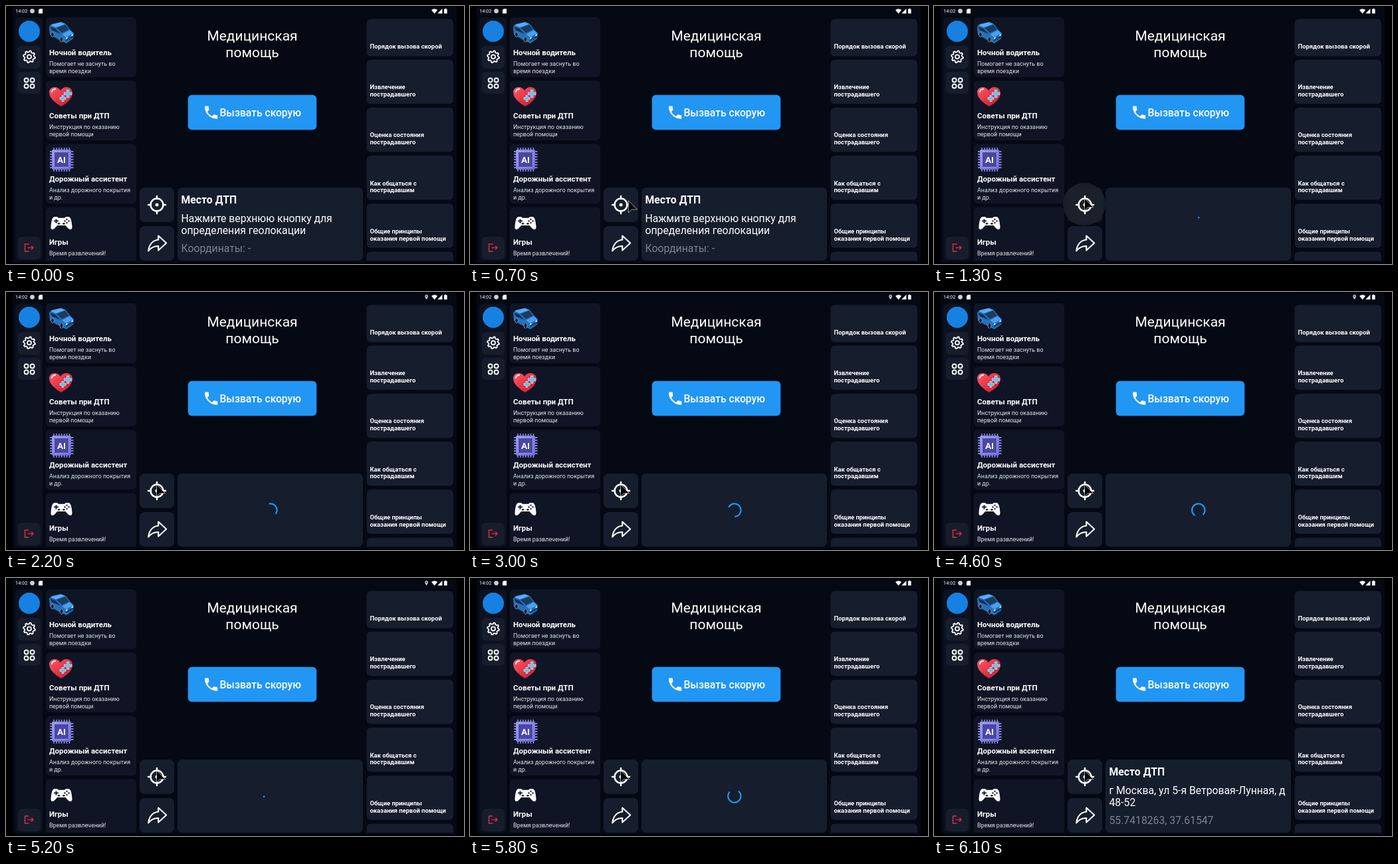
An HTML page that plays this animation: 689x388 px, repeating every 8000 ms.

```html
<!DOCTYPE html>
<html lang="ru">
<head>
<meta charset="utf-8">
<title>Медицинская помощь</title>
<style>
  html, body { margin: 0; width: 100%; height: 100%; overflow: hidden; background: #000; }
  svg { display: block; width: 689px; height: 388px; font-family: Roboto, "Noto Sans", sans-serif; fill: #fff; }
  .side { fill: #0c1220; }
  .card { fill: #0f1524; }
  .tile { fill: #161d2d; }
  .name { font-size: 11.45px; font-weight: 700; }
  .note { font-size: 8.9px; fill: #e4e6ea; }
  .tip { font-size: 9.4px; font-weight: 700; }
  .head { font-size: 21px; text-anchor: middle; }
  .info { font-size: 15.75px; }
  .bold { font-weight: 700; }
  .grey { fill: #7d828d; }
  .line { fill: none; stroke: #fff; stroke-linejoin: round; stroke-linecap: round; }
</style>
</head>
<body>
<svg viewBox="0 0 689 388">
  <defs>
    <clipPath id="view"><rect x="10" y="16" width="668" height="367"/></clipPath>
    <linearGradient id="red" x2="1" y2="1"><stop stop-color="#ff5a62"/><stop offset="1" stop-color="#c9152f"/></linearGradient>
    <linearGradient id="violet" x2="1" y2="1"><stop stop-color="#9a9cf8"/><stop offset="1" stop-color="#6a65d8"/></linearGradient>
  </defs>
  <rect width="689" height="388" fill="#000"/>
  <rect x="10" y="1" width="668" height="385" fill="#040914"/>

  <!-- status bar -->
  <text x="14" y="10.3" font-size="7.4">14:02</text>
  <circle cx="39.5" cy="7.6" r="3.4" fill="#d0d0d0"/>
  <path d="M50.8 4.2h4.2v7h-6V6z"/>
  <path id="pin" d="M632.6 4c-1.5 0-2.4 1-2.4 2.4 0 1.7 2.4 4.8 2.4 4.8s2.4-3.1 2.4-4.8c0-1.4-.9-2.4-2.4-2.4zm0 1.5a.9.9 0 1 1 0 1.8.9.9 0 0 1 0-1.8z" fill="#ccc"/>
  <path d="M640 6q4.600-3.600 9.200 0l-4.600 5.400z"/>
  <path d="M656.400 4v7.200h-7.200z"/>
  <path d="M659 4.700h1.300v-.9h2v.9h1.300v6.600H659z"/>

  <g clip-path="url(#view)">
    <!-- navigation rail -->
    <rect class="side" x="14" y="17" width="41" height="366" rx="6"/>
    <circle cx="35" cy="38" r="16" fill="#1681e2"/>
    <g class="tile">
      <rect x="18" y="60" width="34" height="34" rx="6"/>
      <rect x="18" y="99" width="34" height="33" rx="6"/>
      <rect x="18" y="347" width="34" height="34" rx="6"/>
    </g>
    <g class="line" stroke-width="1.8">
      <path id="gear"/>
      <circle cx="35" cy="76.300" r="3"/>
      <circle cx="30.600" cy="111.500" r="3"/><circle cx="39.600" cy="111.500" r="3"/>
      <circle cx="30.600" cy="120.500" r="3"/><circle cx="39.600" cy="120.500" r="3"/>
      <path d="M34 358h-5.500v11H34M33 363.500h8m-2.500-2.500 2.500 2.500-2.500 2.500" stroke="#e02b3c" stroke-width="1.500"/>
    </g>

    <g id="cards"></g>

    <!-- car -->
    <path d="M65 31l4-4 14-3 7 3 6 8 6 6-1 8-10 7-11-5-14-8z" fill="#2272c4"/>
    <path d="M67 28.500L82 24.500l7 2.500-14 5z" fill="#5fabf2"/>
    <path d="M66.500 31l7.500 2.500 8 8.500-13-5.500z" fill="#15304c"/>
    <path d="M76 33l13-5 6 7.500-11 5z" fill="#1b3b5c"/>
    <path d="M84.500 42.500l11-6 6 4.500-11.500 6z" fill="#4c9fee"/>
    <path d="M90 50l11-6v3.500l-11 6z" fill="#173f68"/>
    <g fill="#121b29" stroke="#7d92a8"><ellipse cx="70" cy="43" rx="2.300" ry="3.700"/><ellipse cx="83.500" cy="50.500" rx="2.500" ry="3.900"/></g>
    <path d="M90 48l2.500-1.300v2L90 50zM98.500 43.500l2.500-1.300v2l-2.500 1.300z" fill="#e7f4ff"/>

    <!-- heart -->
    <path d="M83 151C75 146 65 139 65 130c0-9 12-11 17-3 5-8 18-6 18 4 0 9-10 16-17 20z" fill="url(#red)"/>
    <path d="M69 129q1-4 5-4" class="line" stroke="#ff9ca0" stroke-width="2"/>
    <g fill="#59c5ec" stroke="#d9f5ff" stroke-width=".6">
      <path d="M91.500 126h3.500v4h4v3.500h-4v4h-3.500v-4h-4V130h4z"/>
      <path d="M84 134.500h3v3h3v3h-3v3h-3v-3h-3v-3h3z"/>
    </g>

    <!-- chip -->
    <g id="pins" stroke="#a3a8f6" stroke-width="1.300"></g>
    <rect x="69" y="216" width="29" height="30" rx="2" fill="url(#violet)"/>
    <rect x="72.500" y="219.500" width="22" height="23" rx="1" fill="#4a47a3" stroke="#b4b6ff" stroke-width=".7"/>
    <text x="83.500" y="236" font-size="13.500" font-weight="700" text-anchor="middle">AI</text>

    <!-- gamepad -->
    <g transform="translate(0 42) scale(1 .87)">
      <path d="M73 316h4l2 2h9l2-2h4c4 0 5 10 5.500 17 .3 6-4 6-7 2l-3-4H77l-3 4c-3 4-7 4-6.500-2C68 326 69 316 73 316z"/>
      <g fill="#111827">
        <path d="M74.500 320h2v2.500H79v2h-2.500V327h-2v-2.500H72v-2h2.500z"/>
        <circle cx="91.500" cy="320.500" r="1.300"/><circle cx="91.500" cy="326.500" r="1.300"/>
        <circle cx="88.500" cy="323.500" r="1.300"/><circle cx="94.500" cy="323.500" r="1.300"/>
        <circle cx="79.500" cy="328" r="1.700"/><circle cx="87" cy="328" r="1.700"/>
      </g>
    </g>

    <!-- centre -->
    <text class="head" x="370.500" y="52">Медицинская</text>
    <text class="head" x="370.500" y="77">помощь</text>
    <rect x="273.700" y="133.800" width="193.500" height="52.500" rx="6" fill="#2196f3"/>
    <path transform="translate(295.800 147.300) scale(1.070)" d="M6.620 10.790c1.440 2.830 3.760 5.140 6.590 6.590l2.200-2.200c.27-.27.67-.36 1.020-.24 1.120.37 2.330.57 3.570.57.55 0 1 .45 1 1V20c0 .55-.45 1-1 1-9.390 0-17-7.610-17-17 0-.55.45-1 1-1h3.500c.55 0 1 .45 1 1 0 1.250.2 2.450.57 3.570.11.35.03.74-.25 1.020l-2.200 2.200z"/>
    <text x="321.500" y="166" font-size="15.650" font-weight="500">Вызвать скорую</text>

    <g class="tile">
      <rect x="201" y="273" width="52" height="52" rx="7"/>
      <rect x="201" y="331" width="52" height="52" rx="7"/>
      <rect x="258" y="273" width="279" height="110" rx="7"/>
    </g>
    <circle id="ripple" cx="226" cy="298" r="32" fill="#1c222c"/>
    <g class="line" stroke-width="2.500">
      <circle cx="227" cy="299" r="9.500"/>
      <path d="M227 286v4M227 308v4M214 299h4M236 299h4"/>
      <path d="M229.200 345.500l12 11-12 11v-6.500c-6.500 0-11 2-15 7.500 1-9 6-16 15-17z" stroke-width="2.100"/>
    </g>
    <circle cx="227" cy="299" r="2.500"/>

    <g id="text">
      <text class="info bold" x="263.500" y="297.300">Место ДТП</text>
      <text class="info" id="row1" x="263.500" y="324.500"></text>
      <text class="info" id="row2" x="263.500" y="343.200"></text>
      <text class="info grey" id="row3" x="263.500" y="370"></text>
    </g>
    <path id="spin" fill="none" stroke="#2196f3" stroke-width="2.200" stroke-linecap="square"/>
  </g>

  <path id="cursor" d="M0 0v18l4.800-4.800H13z" fill="#000" stroke="#fff" stroke-width=".6"/>
</svg>
<script>
const $ = id => document.getElementById(id);
const rect = (cls, x, y, w, h) => `<rect class="${cls}" x="${x}" y="${y}" width="${w}" height="${h}" rx="6"/>`;
const text = (cls, x, y, s) => `<text class="${cls}" x="${x}" y="${y}">${s}</text>`;

const menu = [
  ['Ночной водитель', 'Помогает не заснуть во', 'время поездки'],
  ['Советы при ДТП', 'Инструкция по оказанию', 'первой помощи'],
  ['Дорожный ассистент', 'Анализ дорожного покрытия', 'и др.'],
  ['Игры', 'Время развлечений!', '']
];
const tips = [
  ['Порядок вызова скорой'],
  ['Извлечение', 'пострадавшего'],
  ['Оценка состояния', 'пострадавшего'],
  ['Как общаться с', 'пострадавшим'],
  ['Общие принципы', 'оказания первой помощи'],
  []
];
$('cards').innerHTML = menu.map(([name, a, b], i) => {
  const y = 17 + i * 95.1;
  return rect('card', 60, y, 136, 90) + text('name', 65, y + 57, name) +
    text('note', 65, y + 72.8, a) + text('note', 65, y + 83.5, b);
}).join('') + tips.map((rows, i) => {
  const y = i ? 80.7 + (i - 1) * 72.2 : 19.5, h = i ? 66.5 : 56;
  return rect('tile', 542.5, y, 130.5, h) + rows.map((s, k) =>
    text('tip', 547.5, y + h - 11.2 - (rows.length - 1 - k) * 10.9, s)).join('');
}).join('');

for (let i = 0; i < 7; i++) {
  const x = 72 + i * 3.9, y = 219 + i * 4;
  $('pins').innerHTML += `<path d="M${x} 213v36M66 ${y}h35.5"/>`;
}

let gear = '';
for (let i = 0; i < 32; i++) {
  const a = (i + .5) * Math.PI / 16, r = i % 4 < 2 ? 9 : 7;
  gear += `${i ? 'L' : 'M'}${35 + r * Math.cos(a)} ${76.3 + r * Math.sin(a)}`;
}
$('gear').setAttribute('d', gear + 'z');

const LOOP = 8000, STEP = 100, TAP = 1300, DONE = 6100;
const clamp = v => Math.min(1, Math.max(0, v));
const frac = v => v - Math.floor(v);
const show = (id, on) => $(id).setAttribute('visibility', on ? 'visible' : 'hidden');

// cubic-bezier(.4, 0, .2, 1)
function ease(x) {
  let lo = 0, hi = 1;
  for (let i = 0; i < 24; i++) {
    const s = (lo + hi) / 2, q = 1 - s;
    if (1.2 * q * q * s + .6 * q * s * s + s * s * s < x) lo = s; else hi = s;
  }
  return 3 * lo * lo - 2 * lo * lo * lo;
}

function arc(t) {
  const p = frac(t / 1333), turn = 1.5 * Math.PI;
  const head = ease(clamp(p * 2)) * turn, tail = ease(clamp(p * 2 - 1)) * turn;
  const from = -Math.PI / 2 + tail + frac(t / 2222) * 2 * Math.PI + p * Math.PI / 2;
  const sweep = Math.max(head - tail, .01);
  const at = a => `${397.8 + 9.7 * Math.cos(a)} ${328 + 9.7 * Math.sin(a)}`;
  return `M${at(from)}A9.7 9.7 0 ${+(sweep > Math.PI)} 1 ${at(from + sweep)}`;
}

function cursorAt(t) {
  if (t <= 800) {
    const k = 1 - (1 - clamp((t - 100) / 700)) ** 2;
    return [450 - 216 * k, 380 - 89 * k];
  }
  if (t < 1000) return [234, 291];
  return t < 1100 ? [229, 290] : [226.5, 289.5];
}

const before = ['Нажмите верхнюю кнопку для', 'определения геолокации', 'Координаты: -'];
const after = ['г Москва, ул 5-я Ветровая-Лунная, д', '48-52', '55.7418263, 37.61547'];

function draw(now) {
  const t = Math.floor(now % LOOP / STEP) * STEP;
  const busy = t >= TAP && t < DONE;
  show('text', !busy);
  show('spin', busy);
  show('pin', t >= 1600 && t < 5300);
  show('cursor', t >= 100);
  $('cursor').setAttribute('transform', `translate(${cursorAt(t)})`);
  $('ripple').setAttribute('opacity', t < TAP ? 0 : .9 * clamp(1 - (t - TAP) / 400));
  if (busy) $('spin').setAttribute('d', arc(t - 1290));
  (t < DONE ? before : after).forEach((s, i) => { $('row' + (i + 1)).textContent = s; });
}

const start = performance.now();
function tick() {
  draw(performance.now() - start);
  requestAnimationFrame(tick);
}
tick();
</script>
</body>
</html>
```
